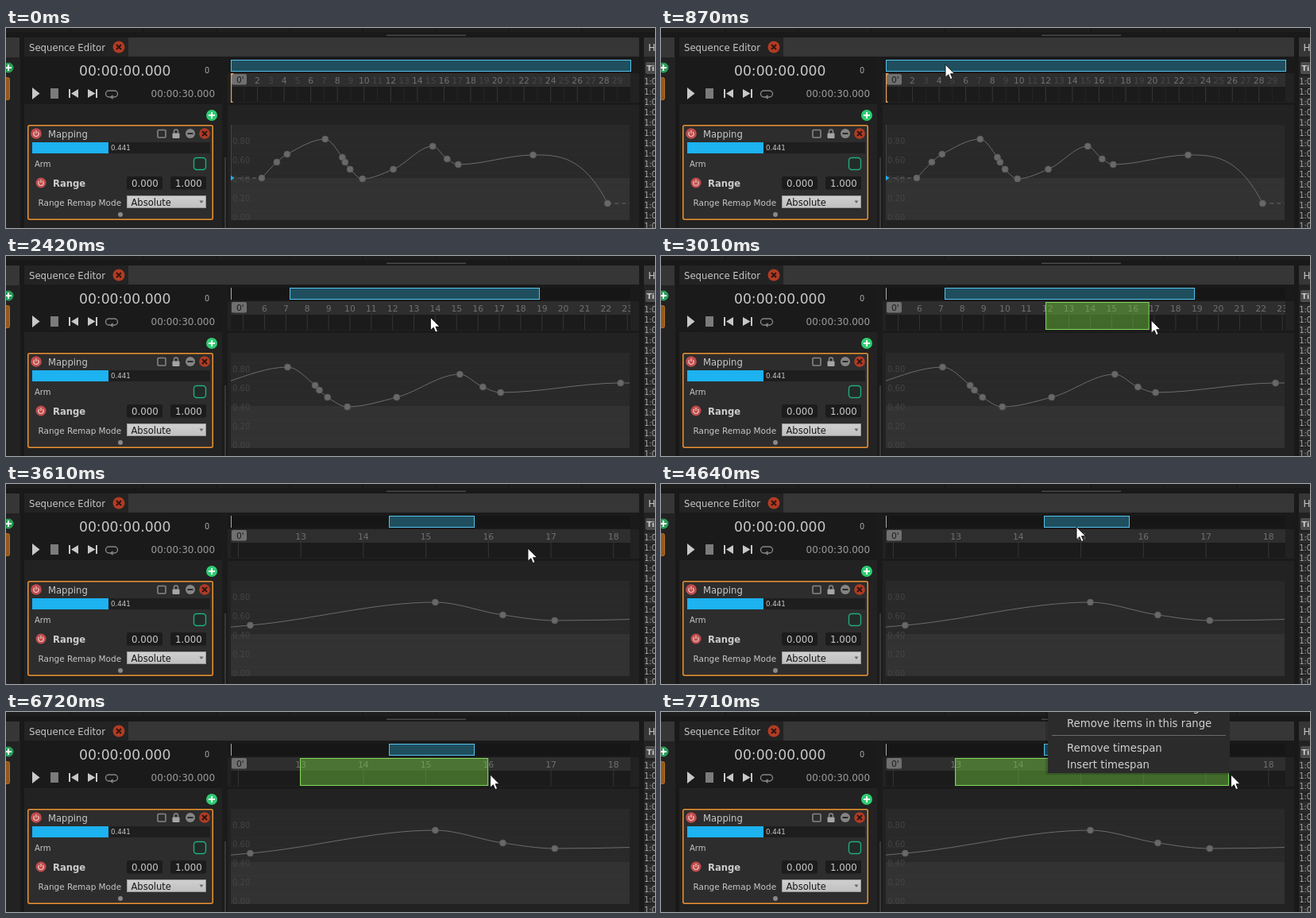
An HTML page for the animation above (8000 ms loop, 817 by 252 pixels).

```html
<!DOCTYPE html>
<html lang="en">
<head>
<meta charset="utf-8">
<title>Sequence editor</title>
<style>
html, body { margin: 0; width: 817px; height: 252px; overflow: hidden; background: #1a1a1a; }
svg { display: block; font-family: "DejaVu Sans", Verdana, sans-serif; fill: #c4c4c4; }
text { white-space: pre; }
.edit .plain, .plainMode .edited { display: none; }
</style>
</head>
<body>
<svg id="stage" width="817" height="252" viewBox="0 0 817 252">
  <defs>
    <clipPath id="rulerClip"><rect x="283" y="57" width="503" height="37"/></clipPath>
    <clipPath id="curveClip"><rect x="283" y="122" width="502" height="120"/></clipPath>
    <linearGradient id="combo" x2="0" y2="1"><stop stop-color="#d0d0d0"/><stop offset="1" stop-color="#c0c0c0"/></linearGradient>
  </defs>
  <g id="frame"></g>
  <g id="overview"></g>
  <g id="views"></g>
  <rect id="range" y="58.5" height="34" fill="#70c83c" fill-opacity=".45" stroke="#7fd858"/>
  <g id="menu"></g>
  <path id="cursor" d="M0 0V16.2L3.8 12.7L6.3 18.6L9 17.5L6.5 11.7H11.6Z" fill="#fff" stroke="#111" stroke-width=".9"/>
</svg>
<script>
const LOOP = 8000, LEFT = 283, WIDTH = 503, BASE = 16.8;
const $ = id => document.getElementById(id);

// ---- markup helpers
const rect = (x, y, w, h, fill, more = '') => `<rect x="${x}" y="${y}" width="${w}" height="${h}" fill="${fill}" ${more}/>`;
const text = (x, y, size, s, fill = '#c8c8c8', more = '') => `<text x="${x}" y="${y}" font-size="${size}" fill="${fill}" ${more}>${s}</text>`;
const path = (d, stroke, width = 1, more = '') => `<path d="${d}" fill="none" stroke="${stroke}" stroke-width="${width}" ${more}/>`;
const shape = (d, fill) => `<path d="${d}" fill="${fill}"/>`;
const dot = (x, y, r, fill, more = '') => `<circle cx="${x}" cy="${y}" r="${r}" fill="${fill}" ${more}/>`;
const close = (x, y, r) => dot(x, y, r, '#b13c24') +
  path(`M${x - 3} ${y - 3}l6 6m0 -6l-6 6`, '#31150f', 2);
const plus = (x, y, r, fill) => dot(x, y, r, fill) + path(`M${x - 4} ${y}h8m-4 -4v8`, '#fff', 2);
const power = (x, y, r) => dot(x, y, r, '#c24c4c') +
  path(`M${x - 2.2} ${y - 2}a3.2 3.2 0 1 0 4.4 0M${x} ${y - 4}v4`, '#e8cccc', 1.2);

// ---- static window
function drawFrame() {
  let s = rect(0, 0, 817, 252, '#191919');
  for (let x = -10; x < 817; x += 92) s += rect(x, 0, 90, 5, '#1e1e1e');
  s += rect(479, 8.5, 100, 1.5, '#484848');

  // left neighbour
  s += rect(0, 12, 17, 25, '#363636') + rect(0, 37, 18, 215, '#222') + plus(3, 50, 6.5, '#2a9c58');
  s += rect(-10, 62.5, 14.5, 28, '#96591d', 'rx="2" stroke="#b8701f"');

  // tab bar and panes
  s += rect(23, 12, 774, 24, '#363636') + rect(23, 12, 131, 24, '#232323') + rect(23, 36, 774, 216, '#222');
  s += rect(23, 36, 249, 60, '#1a1a1a') + rect(279, 36, 518, 21, '#1a1a1a') + rect(272, 36, 7, 216, '#1b1b1b');
  s += rect(279, 94, 518, 3, '#1a1a1a') + rect(275, 163, 2, 89, '#383838');
  s += text(29, 28.5, 11.7, 'Sequence Editor') + close(142, 24, 7.5);

  // transport
  s += text(92, 60, 17.2, '00:00:00.000') + text(250, 57, 9.8, '0', '#aaa') + text(182.5, 87, 12, '00:00:30.000', '#9a9a9a');
  s += shape('M33 75l9.5 7.5l-9.5 7.5z', '#c8c8c8') + rect(56, 76, 10, 13, '#7b7b7b');
  s += shape('M79 77h2v11h-2zM91 77v11l-9 -5.5z', '#c8c8c8') + shape('M113 77h2v11h-2zM103 77v11l9.5 -5.5z', '#c8c8c8');
  s += path('M131 87h-1.5a4 4 0 0 1 0 -8h7a4 4 0 0 1 0 8h-3', '#858585', 1.4) + shape('M134.5 84v6l-4 -3z', '#858585');
  s += plus(259, 110, 7, '#2ecc71');

  // mapping item
  s += rect(27.75, 122.75, 232.5, 118.5, '#2d2d2d', 'rx="2" stroke="#ee9330" stroke-width="1.5"');
  s += power(38, 133, 6.8) + text(53, 137.5, 11.6, 'Mapping');
  s += rect(191, 128.5, 10, 9.5, 'none', 'rx="1" stroke="#858585" stroke-width="1.6"');
  s += path('M211.5 133v-2.5a2.5 2.5 0 0 1 5 0v2.5', '#8c8c8c', 1.4) + rect(209.5, 132.5, 9, 6.5, '#a5a5a5', 'rx="1"');
  s += dot(232, 133, 6, '#858585') + rect(228.5, 132, 7, 2, '#2b2b2b') + close(250, 133, 6.8);
  s += rect(33, 144, 224, 14, '#1e1e1e') + rect(33, 144, 96, 14, '#1db2f0');
  s += text(132, 154, 8.6, '0.441') + text(36, 175, 10, 'Arm');
  s += rect(236.5, 163.5, 15, 15, '#232b28', 'rx="3.5" stroke="#20ad7b" stroke-width="1.4"');
  s += power(44, 195, 6.5) + text(59, 200, 11.6, 'Range', '#ccc', 'font-weight="bold"');
  s += rect(152, 187, 45, 16.5, '#1c1c1c', 'rx="2"') + rect(207, 187, 45, 16.5, '#1c1c1c', 'rx="2"');
  s += text(158, 199.5, 11.8, '0.000') + text(213, 199.5, 11.8, '1.000');
  s += text(40.5, 223.5, 10.45, 'Range Remap Mode') + rect(152.5, 211.5, 99, 15, 'url(#combo)', 'stroke="#999"');
  s += text(157.5, 223.5, 11.5, 'Absolute', '#151515') + shape('M243.5 217.5h5l-2.5 3.5z', '#666');
  s += dot(144, 235, 3, '#888');

  // right neighbour
  s += rect(803, 12, 14, 24, '#363636') + rect(803, 36, 14, 216, '#222') + text(808.5, 28.5, 12, 'Hi');
  s += rect(805, 43, 14, 15, '#4c4c4c', 'rx="2"') + text(806.5, 54, 9.5, 'Time', '#ccc', 'font-weight="bold"');
  for (let i = 0; i < 15; i++) {
    const y = 61 + i * 13;
    s += rect(804, y, 13, 13, i % 2 ? '#252525' : '#2b2b2b') + text(803.5, y + 10, 9.6, '1:0', '#aaa');
  }
  $('frame').innerHTML = s;
}

// ---- curve keys: time (s), height (px)
const KEYS = [
  [2.32, 189], [3.45, 169], [4.22, 159], [7.08, 140], [8.37, 163], [8.57, 169], [8.95, 178],
  [9.88, 190], [12.19, 178], [15.15, 149], [16.23, 165], [17.06, 172], [22.68, 160], [28.27, 221]
];
// visible stretch of time (s) in each zoom
const VIEWS = [[0, 29.98], [4.42, 23.14], [11.88, 18.27]];

// flat at peaks and valleys, harmonic mean elsewhere, steep finish
function slope(i) {
  const secant = j => (KEYS[j + 1][1] - KEYS[j][1]) / (KEYS[j + 1][0] - KEYS[j][0]);
  if (i === 0) return secant(0);
  if (i === KEYS.length - 1) return 3 * secant(i - 1);
  const a = secant(i - 1), b = secant(i);
  return a * b > 0 ? 2 * a * b / (a + b) : 0;
}

function drawView([start, end]) {
  const scale = WIDTH / (end - start);
  const px = t => LEFT + (t - start) * scale;
  const whole = start === 0;
  let ruler = rect(283, 57, 503, 17, '#2e2e2e') + rect(283, 74, 503, 19, '#1b1b1b');
  for (let n = Math.floor(start); n <= Math.min(29, end + 1); n++) {
    const dim = whole && n % 2;
    ruler += rect(px(n) - .5, 74, 1, 19, dim ? '#262626' : '#363636');
    if (scale > 50) ruler += rect(px(n) - .5, 58, 1, 16, '#363636');
    ruler += text(px(n), 70, 10.8, n, dim ? '#474747' : '#707070', 'text-anchor="middle"');
  }
  ruler += rect(284, 58, 19, 13.5, '#707070', 'rx="2"') + text(290, 69, 10.8, "0'", '#1c1c1c');
  if (whole) ruler += rect(283, 57, 1.2, 37, '#e7a052') + shape('M283 57h4l-4 4zM283 90l3 4h-3z', '#e7a052');

  let grid = rect(283, 189, 502, 53, '#323232');
  for (let i = 1; i < 10; i++) grid += rect(283, 242 - i * 12, 502, 1, '#fff', 'opacity=".015"');
  for (let i = 0; i < 5; i++) grid += text(285, 242 - i * 24, 10, (i / 5).toFixed(2), '#444');

  let d = '';
  KEYS.forEach(([t, y], i) => {
    if (!i) { d = `M${px(t)} ${y}`; return; }
    const [pt, py] = KEYS[i - 1], h = (t - pt) / 3;
    d += `C${px(pt + h)} ${py + slope(i - 1) * h} ${px(t - h)} ${y - slope(i) * h} ${px(t)} ${y}`;
  });
  const first = KEYS[0], last = KEYS[KEYS.length - 1];
  const ends = `M${LEFT} ${first[1]}H${px(first[0])}M${px(last[0])} ${last[1]}H${Math.max(785, px(last[0]))}`;
  const nodes = KEYS.map(([t, y]) => dot(px(t), y, 4, '#686868', 'stroke="#585858" stroke-width=".8"')).join('');
  const mark = whole ? rect(283, 122, 1, 25, '#8a8a8a', 'class="plain"') +
    `<g class="edited">${rect(283, 122, 1, 67, '#444')}${shape('M283 185.5l4 3.5l-4 3.5z', '#1db2f0')}</g>` : '';

  return `<g class="edit"><g clip-path="url(#rulerClip)">${ruler}</g><g clip-path="url(#curveClip)">` +
    rect(283, 122, 502, 120, '#292929') + `<g class="edited">${grid}${path(ends, '#666', 1, 'stroke-dasharray="5 4"')}</g>` +
    `<g class="plain">${path(ends, '#666')}</g>` + path(d, '#6c6c6c') +
    `<g class="edited">${nodes}</g>${mark}</g></g>`;
}

function drawOverview() {
  $('overview').innerHTML = rect(283, 40, 503, 15, '#161616') + rect(283, 40, 1, 15, '#aaa') +
    rect(0, 40.5, 0, 14, '#1f4f5e', 'id="window" stroke="#52c3ee"') +
    rect(0, 41, 0, 13, '#217c9c', 'id="drag" stroke="#2696bc"');
}

function drawMenu() {
  $('menu').innerHTML = rect(484, -5, 232, 84, '#000', 'opacity=".15"') + rect(487, -5, 229, 82, '#2b2b2b') +
    text(686, -1, 13.2, 'Select items in this range', '#d0d0d0', 'text-anchor="end"') +
    text(511, 19, 13.25, 'Remove items in this range', '#d0d0d0') + rect(492, 29, 219, 1, '#6a6a6a') +
    text(511, 50, 13.25, 'Remove timespan', '#d0d0d0') + text(511, 71, 13.25, 'Insert timespan', '#d0d0d0');
}

// ---- motion
const clamp = u => Math.min(1, Math.max(0, u));
const out = u => 1 - (1 - u) ** 2;
const smooth = u => u * u * (3 - 2 * u);

// pointer legs: start, end, x and y reached
const LEGS = [
  [0, 1, 440, 76], [350, 650, 378, 34], [650, 870, 358, 46], [1750, 1751, 672, 44],
  [2120, 2700, 484, 80], [2720, 3230, 657, 81], [3750, 4600, 523, 54],
  [4600, 5510, 366, 79], [5750, 5970, 370, 79], [6312, 7230, 717.5, 79]
];

function pointer(t) {
  let x = 0, y = 0;
  for (const [from, to, endX, endY] of LEGS) {
    const u = out(clamp((t - from) / (to - from)));
    x += (endX - x) * u;
    y += (endY - y) * out(u);
  }
  return [x, y];
}

const BEAT = 73.2, PHASE = 350;
const hold = t => Math.max(0, PHASE + Math.floor((t - PHASE) / BEAT) * BEAT);

const show = (el, on) => { el.style.display = on ? '' : 'none'; };
function span(el, from, to) {
  el.setAttribute('x', from);
  el.setAttribute('width', Math.max(0, to - from));
}

drawFrame();
drawOverview();
drawMenu();
$('views').innerHTML = VIEWS.map(drawView).join('');
const groups = [...$('views').children];
const edge = s => Math.floor(LEFT + s * BASE) + .5;

function render(t) {
  const held = hold(t), [x, y] = pointer(held);
  const view = t < 1750 ? 0 : t < 3610 ? 1 : 2;
  const plain = t >= 940 && t < 1820;
  groups.forEach((g, i) => {
    show(g, i === view);
    g.setAttribute('class', plain ? 'plainMode' : 'edit');
  });
  span($('window'), ...VIEWS[view].map(edge));

  show($('drag'), t >= 1020 && t < 1750);
  span($('drag'), 358.5, 358.5 + 312.5 * smooth(clamp((held - 960) / 560)));

  const second = t >= 6360;
  show($('range'), second || (t >= 2790 && t < 3610));
  span($('range'), second ? 370.5 : 484.5, x - 3);

  show($('menu'), t >= 7710);
  show($('cursor'), (t >= 350 && t < 940) || t >= 1820);
  $('cursor').setAttribute('transform', `translate(${x} ${y})`);
}

const begin = performance.now();
function tick() {
  render((performance.now() - begin) % LOOP);
  requestAnimationFrame(tick);
}
tick();
</script>
</body>
</html>
```
